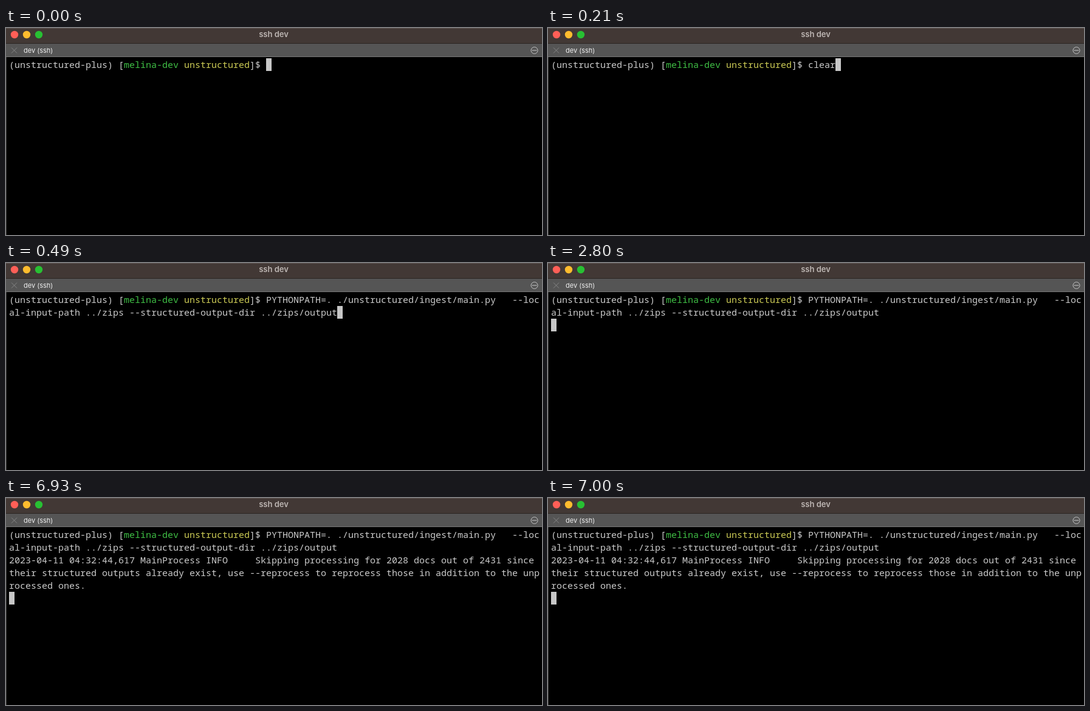
Animation, 882 px wide and 342 px high, one loop 8 s. Source, as an HTML page:

```html
<!DOCTYPE html>
<html lang="en">
<head>
<meta charset="utf-8">
<title>ssh dev</title>
<style>
html, body { margin: 0; width: 100%; height: 100%; overflow: hidden; background: #000; }
svg, pre, #cursor { position: absolute; }
svg { left: 0; top: 0; font-family: Inter, sans-serif; }
pre {
  left: 5px; top: 50px; margin: 0; color: #cbcbcb;
  font: 15px/21px "Noto Sans Mono", monospace; font-variant-ligatures: none;
}
#cursor { width: 9px; height: 21px; background: #c7c7c7; }
.host { color: #3fbf45; }
.dir { color: #cccb55; }
</style>
</head>
<body>
<svg width="882" height="342">
  <rect width="882" height="26" fill="#423835"/>
  <rect width="882" height="1" fill="#5b524f"/>
  <rect y="25" width="882" height="1" fill="#2b2523"/>
  <rect y="26" width="882" height="22" fill="#555"/>
  <rect y="47" width="882" height="1" fill="#777"/>
  <rect y="48" width="1" height="294" fill="#3c3c3c"/>
  <circle cx="14" cy="11" r="6.2" fill="#ff5f57"/>
  <circle cx="34" cy="11" r="6.2" fill="#febc2e"/>
  <circle cx="54" cy="11" r="6.2" fill="#28c033"/>
  <text x="440.5" y="15" text-anchor="middle" font-size="13" font-weight="600" fill="#bdb6b3">ssh dev</text>
  <path d="M9 32.5l9 9m0-9l-9 9" stroke="#858585"/>
  <text x="29" y="41" font-size="11" fill="#f0f0f0">dev (ssh)</text>
  <g fill="#c4c4c4">
    <circle cx="869.5" cy="37" r="5.5" fill="none" stroke="#c4c4c4"/>
    <circle cx="867" cy="37" r=".9"/>
    <circle cx="869.5" cy="37" r=".9"/>
    <circle cx="872" cy="37" r=".9"/>
  </g>
</svg>
<pre>(unstructured-plus) [<span class="host">melina-dev</span> <span class="dir">unstructured</span>]$ <span id="typed"></span></pre>
<div id="cursor"></div>
<script>
const LOOP = 8000, PROMPT_COLS = 47;
const typed = document.getElementById("typed");
const cursor = document.getElementById("cursor");

const command = "PYTHONPATH=. ./unstructured/ingest/main.py   --loc\n" +
  "al-input-path ../zips --structured-output-dir ../zips/output";
const log = "2023-04-11 04:32:44,617 MainProcess INFO     Skipping processing for 2028 docs out of 2431 since\n" +
  "their structured outputs already exist, use --reprocess to reprocess those in addition to the unp\n" +
  "rocessed ones.\n";

// [start time in ms, text after the prompt]
const steps = [
  [0, ""],
  [210, "clear"],
  [490, command],
  [1610, command + "\n"],
  [6930, command + "\n" + log]
];

let shown;
function draw(now) {
  const t = now % LOOP;
  const text = steps.findLast(([start]) => t >= start)[1];
  if (text !== shown) {
    shown = typed.textContent = text;
    const lines = text.split("\n"), row = lines.length - 1;
    const col = lines[row].length + (row ? 0 : PROMPT_COLS);
    cursor.style.left = 5 + col * 9 + "px";
    cursor.style.top = 50 + row * 21 + "px";
  }
}

const begin = performance.now();
function tick() {
  draw(performance.now() - begin);
  requestAnimationFrame(tick);
}
tick();
</script>
</body>
</html>
```
